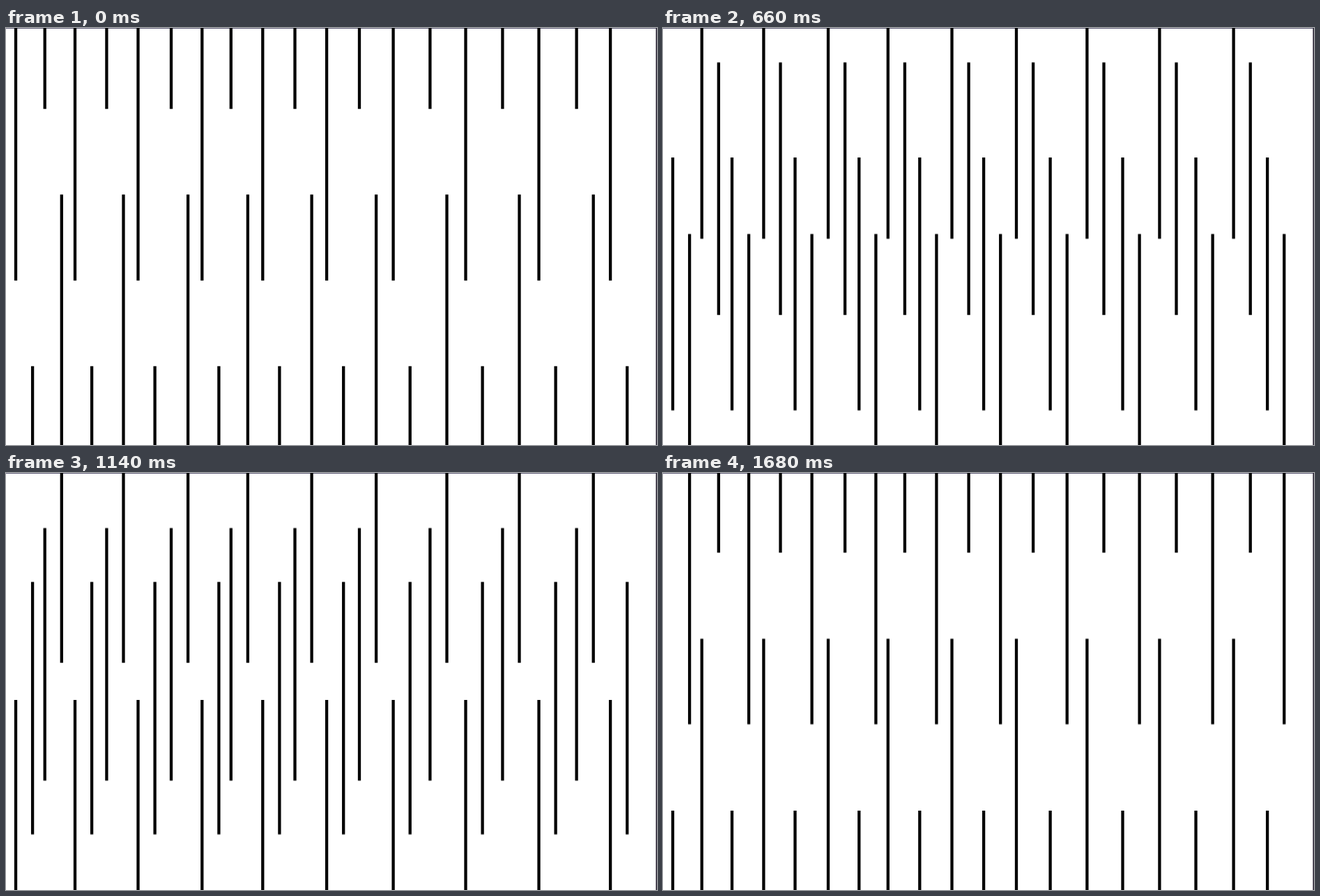
Recreate the animation shown at these times as an HTML page. Size 934 by 599 pixels, loop 1710 ms.

```html
<!DOCTYPE html>
<html lang="en">
<head>
<meta charset="utf-8">
<title>Sliding lines</title>
<style>
  html, body { margin: 0; width: 100%; height: 100%; overflow: hidden; background: #fff; }
  svg { display: block; width: 934px; height: 599px; }
  path { fill: none; stroke: #000; stroke-width: 4.3; }
  .down { --mid: 237.3px; --end: 493.4px; }
  .up { --mid: -241.5px; --end: -496.4px; }
  .down, .up { animation: slide 1710ms -1ms infinite; }

  /* 57 ticks of 30 ms; the speed rises slightly after tick 28 */
  @keyframes slide {
    0% { transform: translateY(0); animation-timing-function: steps(28, end); }
    49.12281% { transform: translateY(var(--mid)); animation-timing-function: steps(29, end); }
    100% { transform: translateY(var(--end)); }
  }
</style>
</head>
<body>
<svg viewBox="0 0 934 599">
  <rect width="934" height="1" fill="#62607a"/>
  <rect x="932.4" width="1.6" height="599" fill="#2b2536"/>
  <path class="down"/>
  <path class="up"/>
</svg>
<script>
  const LENGTH = 362.7;
  const STAGGER = 246.5;  // every second line sits this much higher
  const PAIR_GAP = 24.1;  // from a falling line to its rising partner

  // Uneven column positions, left to right
  const columns = [14, 55.7, 99, 144.4, 189.5, 237, 281.3, 322.8, 368.3, 414.5,
    460.1, 507, 555.6, 608.4, 659.5, 712.4, 764.5, 818.6, 867.1];

  function drawLines(selector, shift, top) {
    const d = columns.map((x, i) => `M${x + shift} ${top - (i % 2) * STAGGER}v${LENGTH}`);
    document.querySelector(selector).setAttribute('d', d.join(''));
  }

  drawLines('.down', 0, .1);
  drawLines('.up', PAIR_GAP, 485.8);
</script>
</body>
</html>
```
